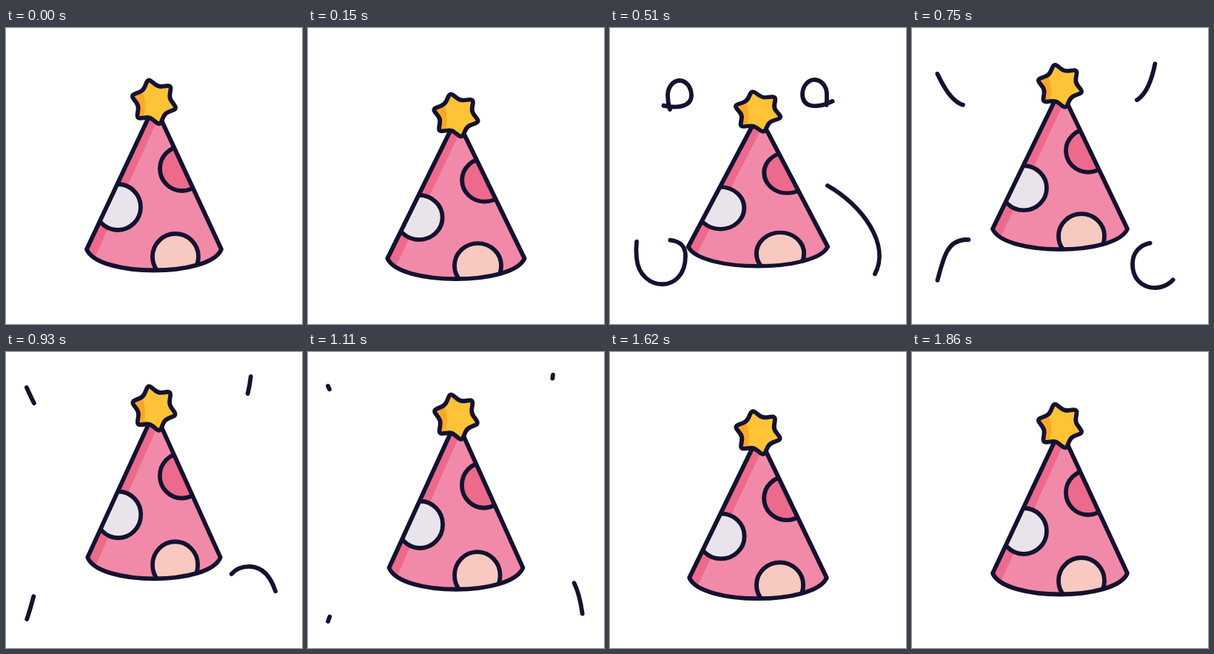
Animation of 400 by 400 pixels, one loop 1.89 s. Source, as an HTML page:

```html
<!DOCTYPE html>
<html lang="en">
<head>
<meta charset="utf-8">
<title>Party hat</title>
<style>
  html, body { margin: 0; width: 100%; height: 100%; overflow: hidden; background: #fff; }
  svg { display: block; width: 100%; height: 100%; }
  .line, .spot { stroke: #14122f; stroke-width: 5.8; stroke-linecap: round; stroke-linejoin: round; }
  .line { fill: none; }
</style>
</head>
<body>
<svg viewBox="0 0 400 400">
  <defs>
    <path id="cone" d="M195 116L109 299C125 337 275 337 291 299L207 118Z"/>
    <path id="star"/>
    <clipPath id="inCone"><use href="#cone"/></clipPath>
    <clipPath id="inStar"><use href="#star"/></clipPath>
  </defs>
  <g id="streamers"></g>
  <g id="hat">
    <g clip-path="url(#inCone)">
      <use href="#cone" fill="#f18aa8"/>
      <path d="M190 100H216L120 310 95 320Z" fill="#ec6a8c"/>
      <circle class="spot" cx="238" cy="190" r="30" fill="#ec6a8c"/>
      <circle class="spot" cx="151" cy="242" r="31" fill="#e9e4ec"/>
      <circle class="spot" cx="229" cy="309" r="31" fill="#f7c9c0"/>
    </g>
    <use href="#cone" class="line"/>
    <use href="#star" fill="#ffc337"/>
    <path d="M180 78Q196 104 180 134H160V78Z" fill="#ffa629" clip-path="url(#inStar)"/>
    <use href="#star" class="line"/>
  </g>
</svg>
<script>
const LOOP = 1890;
const $ = id => document.getElementById(id);
const clamp = u => Math.min(1, Math.max(0, u));
const easeInOut = u => (1 - Math.cos(Math.PI * clamp(u))) / 2;
const easeOut = u => 1 - (1 - clamp(u)) ** 3;

// Swings from rest through a few [time, value] extremes and back to rest
const swing = (rest, ...extremes) => t => {
  let value = rest, start = 0;
  for (const [end, next] of [...extremes, [1860, rest]]) {
    value += (next - value) * easeInOut((t - start) / (end - start));
    start = end;
  }
  return value;
};

// Six-pointed star with rounded corners
function starPath(cx, cy, outer, inner) {
  const pts = Array.from({ length: 12 }, (_, i) => {
    const a = (i * 30 - 104) * Math.PI / 180, r = i % 2 ? inner : outer;
    return [cx + r * Math.cos(a), cy + r * Math.sin(a)];
  });
  const toward = (p, q) => p.map((v, k) => v + (q[k] - v) * 0.3);
  return pts.map((p, i) =>
    `${i ? "L" : "M"}${toward(p, pts[(i + 11) % 12])}Q${p} ${toward(p, pts[(i + 1) % 12])}`
  ).join("") + "Z";
}
$("star").setAttribute("d", starPath(200, 100, 32.3, 21.3));

// The squash and stretch trail behind the bounce
const baseY = swing(299, [270, 320], [750, 271.5], [1440, 309]);
const scaleX = swing(1, [350, 1.046], [950, 0.986], [1500, 1.026]);
const scaleY = swing(1, [400, 0.91], [1080, 1.025], [1500, 0.98]);

// A line whose head runs along the path and whose tail follows after a lag
function streamer(d, { start, lag, duration, ramp }) {
  const path = document.createElementNS("http://www.w3.org/2000/svg", "path");
  path.setAttribute("class", "line");
  path.setAttribute("d", d);
  $("streamers").append(path);
  const total = path.getTotalLength();
  const along = t => total * easeOut(clamp((t - start) / duration) ** ramp);
  return t => {
    const tail = along(t - lag), length = along(t) - tail;
    path.style.display = length > 0 ? "" : "none";
    path.setAttribute("stroke-dasharray", `${length} 9999`);
    path.setAttribute("stroke-dashoffset", -tail);
  };
}

const early = { start: 165, lag: 230, duration: 970, ramp: 1 };
const late = { start: 245, lag: 225, duration: 1170, ramp: 1.2 };
const streamers = [
  streamer("M137 183C110 153 78 128 78 91A16 20 0 0 1 110 91C110 109 84 109 66 103C50 95 40 75 27 46", early),
  streamer("M257 189C270 164 294 133 293 91A16.5 20 0 0 0 260 89C260 110 284 109 306 96C319 86 328 60 331 31", early),
  streamer("M117 204C70 209 30 255 36 311C40 357 102 360 102 308C102 290 89 286 72 286C40 288 42 325 27 364", early),
  streamer("M275 204C330 225 385 290 356 336C341 360 298 356 298 319C298 301 312 289 331 290C358 292 368 325 372 364", late)
];

function draw(t) {
  $("hat").setAttribute("transform",
    `translate(200 ${baseY(t)}) scale(${scaleX(t)} ${scaleY(t)}) translate(-200 -299)`);
  streamers.forEach(update => update(t));
}

function tick() {
  draw(performance.now() % LOOP);
  requestAnimationFrame(tick);
}
tick();
</script>
</body>
</html>
```
